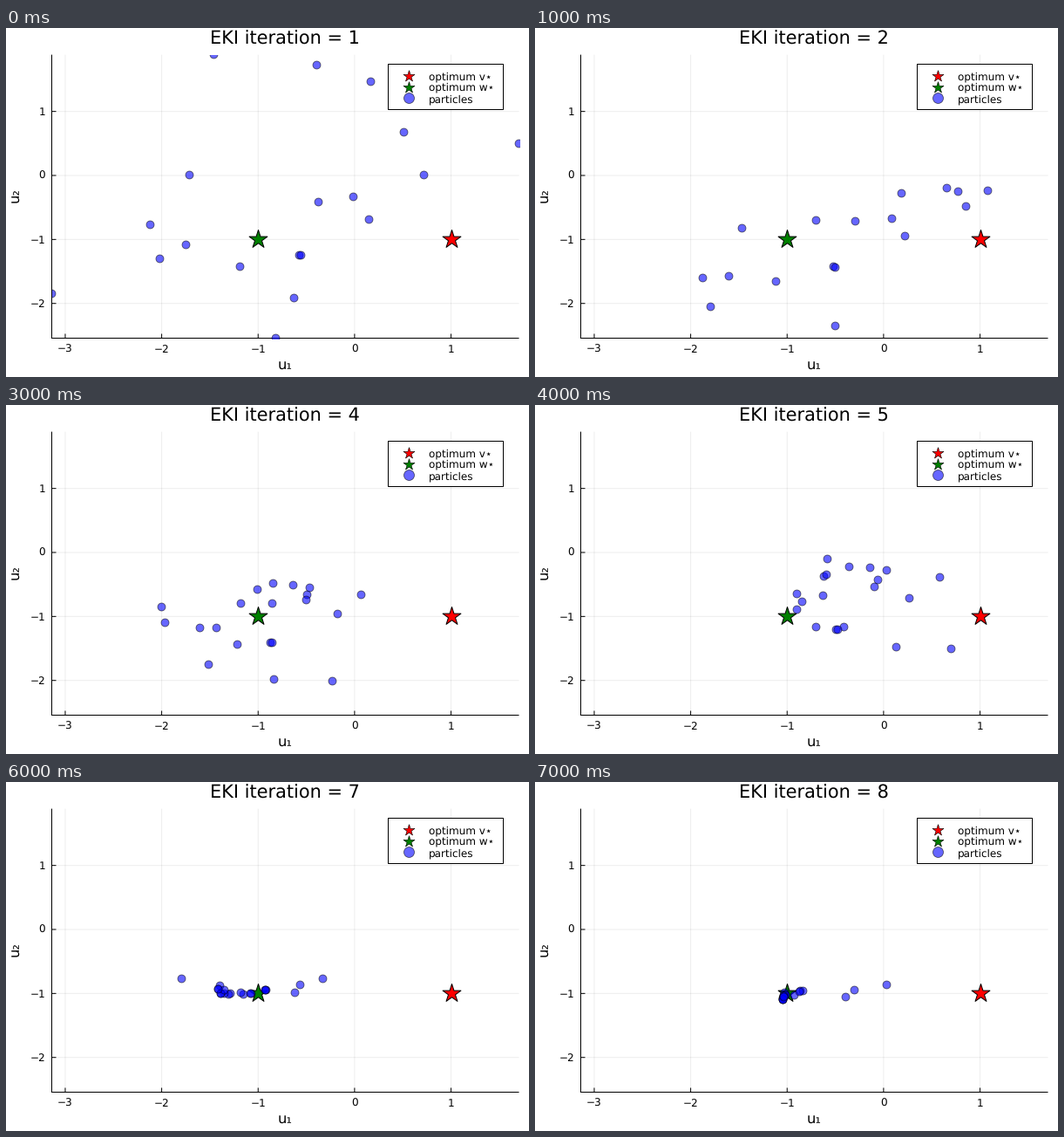
A matplotlib script for the animation above (8 s loop, 600 by 400 pixels).

```python
import numpy as np
import matplotlib.pyplot as plt
from matplotlib.animation import FuncAnimation
from matplotlib.patches import Rectangle

W, H, DPI = 600, 400, 100
PT = 72 / DPI                                   # points per pixel
LEFT, RIGHT, TOP, BOTTOM = 52.5, 588.5, 30.6, 355.5

plt.rcParams["font.family"] = "DejaVu Sans"
plt.rcParams["text.hinting"] = "no_hinting"
fig = plt.figure(figsize=(W / DPI, H / DPI), dpi=DPI, facecolor="white")
ax = fig.add_axes([0, 0, 1, 1])
ax.set_xlim(0, W)
ax.set_ylim(H, 0)
ax.axis("off")


def px(u):
    return 399.9 + 110.65 * u


def py(u):
    return 169 - 73.35 * u


def line(x, y, color="black", z=1):
    ax.plot(x, y, color=color, lw=PT, zorder=z, solid_capstyle="butt", snap=False)


def text(x, y, s, size, ha="center", **kw):
    return ax.text(x, y, s, fontsize=size * PT, ha=ha, va="baseline", **kw)


def mark(x, y, shape, size, fill, edge="black", z=3, lw=0.8):
    return ax.scatter(x, y, s=(size * PT) ** 2, marker=shape, facecolors=[fill],
                      edgecolors=[edge], linewidths=lw * PT, zorder=z)


def label(v):
    return str(v).replace("-", "\u2212")


# Grid, ticks and axis lines
GRID = (0, 0, 0, 0.07)
for v in range(-3, 2):
    x = px(v)
    line([x, x], [TOP, BOTTOM], GRID)
    line([x, x], [BOTTOM, BOTTOM - 5], z=2)
    text(x, 371.5, label(v), 12)
for v in range(-2, 2):
    y = py(v)
    line([LEFT, RIGHT], [y, y], GRID)
    line([LEFT, LEFT + 5], [y, y], z=2)
    text(45, y + 4.2, label(v), 12, ha="right")
line([LEFT - 0.5, RIGHT], [BOTTOM, BOTTOM], z=2)
line([LEFT, LEFT], [TOP, BOTTOM], z=2)
text(320.2, 391.6, "u\u2081", 16.4)
text(15.5, 191.2, "u\u2082", 16.4, rotation=90, rotation_mode="anchor")
title = text(320.2, 18.3, "", 20.9)

# Optima and legend
BLUE, DARK = (0, 0, 1, 0.6), (0, 0, 0, 0.6)
V, W_OPT = np.array([1, -1]), np.array([-1, -1])
ax.add_patch(Rectangle((438.5, 41.5), 132, 52, fc="white", ec="black",
                       lw=PT, zorder=5, snap=False))
mark(462, 80.4, "o", 12, BLUE, DARK, z=6)
text(485.3, 85, "particles", 12, ha="left", zorder=6)
for spot, color, y, name in ((V, "red", 54.6, "v"), (W_OPT, "green", 67.5, "w")):
    mark(px(spot[0]), py(spot[1]), "*", 22, color, lw=1)
    mark(462, y, "*", 13.6, color, z=6, lw=0.6)
    text(485.3, y + 4.4, f"optimum {name}\u22c6", 12, ha="left", zorder=6)

# Starting ensemble (u1, u2) and the ensemble gain of each Kalman update
START = np.array([
    (-1.464, 1.890), (-0.398, 1.727), (0.167, 1.475), (0.639, 1.263),
    (0.503, 0.680), (1.703, 0.499), (0.711, 0.014), (-1.713, 0.010),
    (-0.018, -0.327), (-0.380, -0.413), (0.145, -0.683), (-2.121, -0.766),
    (-1.753, -1.080), (-2.019, -1.294), (-1.188, -1.415), (-0.574, -1.238),
    (-0.560, -1.243), (-0.635, -1.915), (-3.140, -1.840), (-0.822, -2.541)])
GAINS = [(0.068, -0.233), (0.155, 0.250), (-0.560, -0.259), (0.464, 0.247),
         (-0.427, -0.717), (-0.338, 0.493), (0.370, -0.110)]


def loss(u):
    """Product of the distances to both optima."""
    return np.linalg.norm(u - V, axis=1) * np.linalg.norm(u - W_OPT, axis=1)


steps = [START]
for gain in GAINS:
    u = steps[-1]
    steps.append(u + np.outer(loss(u), gain))

dots = mark([], [], "o", 9, BLUE, DARK, z=4)
dots.set_clip_path(Rectangle((LEFT, TOP), RIGHT - LEFT, BOTTOM - TOP,
                             transform=ax.transData))


def draw(i):
    u1, u2 = steps[i].T
    dots.set_offsets(np.column_stack([px(u1), py(u2)]))
    title.set_text(f"EKI iteration = {i + 1}")
    return dots, title


anim = FuncAnimation(fig, draw, frames=len(steps), interval=1000, repeat=True,
                     repeat_delay=0)
plt.show()
```
